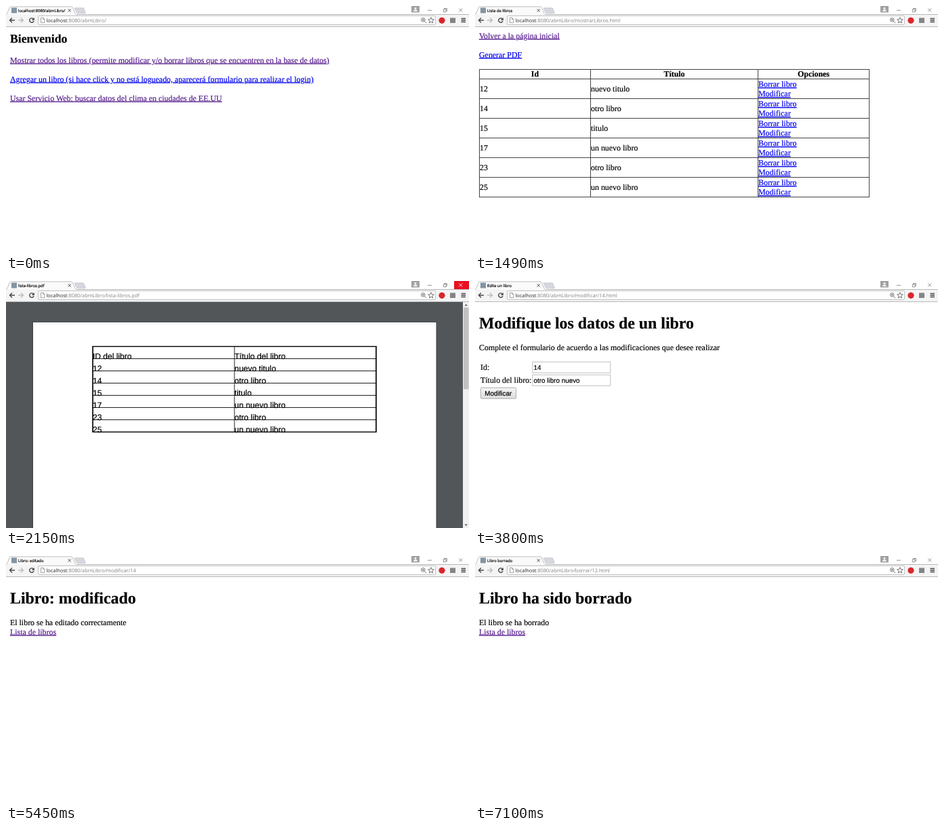
Write an HTML page that moves like this. It is 683x364 px and loops after 8000 ms.

```html
<!DOCTYPE html>
<html lang="es">
<head>
<meta charset="utf-8">
<style>
html, body { margin: 0; width: 100%; height: 100%; overflow: hidden; background: #fff; }
svg { display: block; width: 683px; height: 364px; }
text {
  font: 11.92px "Liberation Serif", serif; text-rendering: geometricPrecision; white-space: pre;
  color: #000; fill: currentColor; stroke: currentColor; stroke-width: .18px;
}
.h1 { font-size: 23.85px; font-weight: bold; }
.h2 { font-size: 17.65px; font-weight: bold; }
.th { font-weight: bold; text-anchor: middle; }
.link { color: #00e; text-decoration: underline; }
.seen { color: #551a8b; text-decoration: underline; }
.pdf { font: 12px "Liberation Sans", sans-serif; }
.field { font: 9.9px "Liberation Sans", sans-serif; }
.tab { font: 5.8px "Open Sans", sans-serif; }
.url { font: 7.4px "Open Sans", sans-serif; color: #222; stroke: none; }
</style>
</head>
<body>
<svg viewBox="0 0 683 364">
  <defs>
    <linearGradient id="face" x2="0" y2="1">
      <stop stop-color="#f6f6f6"/><stop offset="1" stop-color="#dcdcdc"/>
    </linearGradient>
  </defs>
  <g id="page"></g>
  <g id="chrome" fill="none">
    <path fill="#fff" d="M0 0H683V13H0z"/>
    <path fill="#f4f4f4" d="M0 12.5H683V30H0z"/>
    <path stroke="#b8b8b8" d="M0 12.5H683M0 30.5H683"/>
    <path fill="#fafafa" stroke="#b0b0b0" stroke-width=".8" d="M0 12.6Q2 12 3 8L5 2.5Q5.6 1 7 1H96Q98 1 98.7 3L102 11Q102.7 12.6 104.5 12.6"/>
    <path fill="#f7f7f7" d="M1 12H103.5V13.5H1z"/>
    <path fill="#d5d8de" stroke="#b9bcc2" stroke-width=".6" d="M101.5 2.8H113.5Q114.6 2.8 115 4L117.3 9.5Q117.6 10.8 116 10.8H106Q104.6 10.8 104 9.5L101.3 4Q101 2.8 101.5 2.8z"/>
    <rect x="8" y="2.5" width="8" height="8" fill="#8195a5"/>
    <path stroke="#444" d="M91.7 4.5l4 4m0-4l-4 4"/>
    <rect x="47.5" y="14.5" width="586" height="13" rx="1.5" fill="#fff" stroke="#bcbcbc" stroke-width=".9"/>
    <g stroke="#484848" stroke-width="1.4">
      <path d="M13 21H6M9 17.5L5.5 21L9 24.5"/>
      <path stroke="#bdbdbd" d="M18 21h7M22 17.5l3.5 3.5l-3.5 3.5"/>
      <path d="M40.3 18.9A3.2 3.2 0 1 0 41 22"/>
      <path fill="#484848" stroke="none" d="M41.8 17v4h-4z"/>
      <path d="M671.5 18.5h6.5m-6.5 2.5h6.5m-6.5 2.5h6.5"/>
    </g>
    <path fill="#fff" stroke="#888" stroke-width=".8" d="M51.5 17.3h3.3l2 2v5.4h-5.3zM54.7 17.3v2.2h2"/>
    <g stroke="#666" stroke-width=".9">
      <circle cx="615.3" cy="20.3" r="2.8"/>
      <path d="M617.4 22.4l2.8 2.8M613.8 20.3h3m-1.5-1.5v3"/>
      <path id="star"/>
    </g>
    <circle cx="643" cy="21.3" r="4.6" fill="#d9262c"/>
    <rect x="655" y="17.5" width="8" height="7.5" fill="#858585"/>
    <path fill="#a2a2a2" d="M598 0h12v9.5h-12z"/>
    <circle cx="604" cy="3.6" r="1.5" fill="#fff"/>
    <path fill="#fff" d="M601.2 7.8q0-2.3 2.8-2.3t2.8 2.3z"/>
    <path stroke="#777" stroke-width=".8" d="M622 6.3h6M645.3 4.9h3.8v3.8h-3.8zM646.6 4.8v-1.3h3.8v3.8h-1.2"/>
    <path id="closeBg" fill="#e81123" d="M661 0h22v12h-22z"/>
    <path id="closeX" stroke-width=".8" d="M668.2 3.5l5 5m0-5l-5 5"/>
    <text id="title" class="tab" x="18" y="8.5"></text>
    <text class="url" x="59.5" y="23.6">localhost<tspan id="path" fill="#808080"></tspan></text>
  </g>
</svg>
<script>
const $ = id => document.getElementById(id);
const text = (x, y, s, cls = '') => `<text x="${x}" y="${y}" class="${cls}">${s}</text>`;
const rect = (x, y, w, h, fill, extra = '') =>
  `<rect x="${x}" y="${y}" width="${w}" height="${h}" fill="${fill}" ${extra}/>`;

// Ruled table from column and row line positions
const grid = (xs, ys, color) => {
  const d = xs.map(x => `M${x} ${ys[0]}V${ys.at(-1)}`).join('') +
    ys.map(y => `M${xs[0]} ${y}H${xs.at(-1)}`).join('');
  return `<path d="${d}" stroke="${color}" stroke-linecap="square"/>`;
};

const books = [[12, 'nuevo titulo'], [14, 'otro libro'], [15, 'titulo'],
  [17, 'un nuevo libro'], [23, 'otro libro'], [25, 'un nuevo libro']];

const home = () =>
  text(6, 53.5, 'Bienvenido', 'h2') +
  text(6, 83.5, 'Mostrar todos los libros (permite modificar y/o borrar libros que se encuentren en la base de datos)', 'seen') +
  text(6, 111.5, 'Agregar un libro (si hace click y no está logueado, aparecerá formulario para realizar el login)', 'link') +
  text(6, 139.5, 'Usar Servicio Web: buscar datos del clima en ciudades de EE.UU', 'seen');

const list = () =>
  text(6, 47.5, 'Volver a la página inicial', 'seen') +
  text(6, 75.5, 'Generar PDF', 'link') +
  grid([6.5, 170.5, 417.5, 581.5], [93.5, ...Array.from({length: 7}, (_, i) => 107.5 + 29 * i)], '#444') +
  text(88.5, 104.3, 'Id', 'th') + text(294, 104.3, 'Título', 'th') + text(499.5, 104.3, 'Opciones', 'th') +
  books.map(([id, name], i) => {
    const y = 126 + 29 * i;
    return text(7, y, id) + text(171, y, name) +
      text(418, y - 7, 'Borrar libro', 'link') + text(418, y + 7, 'Modificar', 'link');
  }).join('');

const pdf = () =>
  rect(0, 31, 683, 333, '#525659') +
  rect(38.5, 60, 597, 304, '#45494b') + rect(40, 61, 594.5, 303, '#fff') +
  grid([128, 337, 546], Array.from({length: 8}, (_, i) => 96.5 + 18 * i), '#222') +
  rect(128, 96.5, 418, 126, 'none', 'stroke="#000" stroke-width="1.4"') +
  [['ID del libro', 'Título del libro'], ...books].map(([id, name], i) =>
    text(128, 114.5 + 18 * i, id, 'pdf') + text(337, 114.5 + 18 * i, name, 'pdf')).join('') +
  rect(674, 31, 9, 333, '#f1f1f1') + rect(675, 39, 7.5, 120.5, '#c1c1c1') +
  '<path fill="#555" d="M676.5 36.5l2.2-2.5l2.2 2.5zM676.5 358.5l2.2 2.5l2.2-2.5z"/>';

const input = (y, value) =>
  rect(84.8, y, 115, 16, '#fff', 'stroke="#c0c0c0"') + text(86.5, y + 11.9, value, 'field');

const form = () =>
  text(6, 69.5, 'Modifique los datos de un libro', 'h1') +
  text(6, 101.5, 'Complete el formulario de acuerdo a las modificaciones que desee realizar') +
  text(8, 130.5, 'Id:') + text(8, 149.5, 'Título del libro:') +
  input(119.3, '14') + input(138.3, 'otro libro nuevo') +
  rect(8.5, 157.3, 52, 16, 'url(#face)', 'rx="1" stroke="#b0b0b0"') +
  text(14.2, 169.2, 'Modificar', 'field');

const notice = (heading, message) => () =>
  text(6, 69.5, heading, 'h1') + text(6, 101.5, message) + text(6, 115.5, 'Lista de libros', 'seen');

// Start time, tab title, address path, page
const scenes = [
  [0, 'localhost:8080/abmLibro/', '', home],
  [500, 'Lista de libros', 'mostrarLibros.html', list],
  [2150, 'lista-libros.pdf', 'lista-libros.pdf', pdf],
  [3800, 'Edite un libro', 'modificar/14.html', form],
  [5450, 'Libro: editado', 'modificar/14', notice('Libro: modificado', 'El libro se ha editado correctamente')],
  [7100, 'Libro borrado', 'borrar/12.html', notice('Libro ha sido borrado', 'El libro se ha borrado')]
];

$('star').setAttribute('d', 'M' + Array.from({length: 10}, (_, i) => {
  const r = i % 2 ? 2 : 4.6, a = i * Math.PI / 5;
  return `${(627 + r * Math.sin(a)).toFixed(2)} ${(21.3 - r * Math.cos(a)).toFixed(2)}`;
}).join('L') + 'z');

const start = performance.now();
let shown;
function draw(now) {
  const time = Math.max(0, now - start) % 8000;
  const scene = scenes.findLast(s => s[0] <= time);
  if (scene !== shown) {
    const [, title, path, page] = shown = scene;
    const hot = page === pdf;
    $('title').textContent = title;
    $('path').textContent = ':8080/abmLibro/' + path;
    $('page').innerHTML = page();
    $('closeBg').style.display = hot ? '' : 'none';
    $('closeX').setAttribute('stroke', hot ? '#fff' : '#777');
  }
  requestAnimationFrame(draw);
}
draw(start);
</script>
</body>
</html>
```
